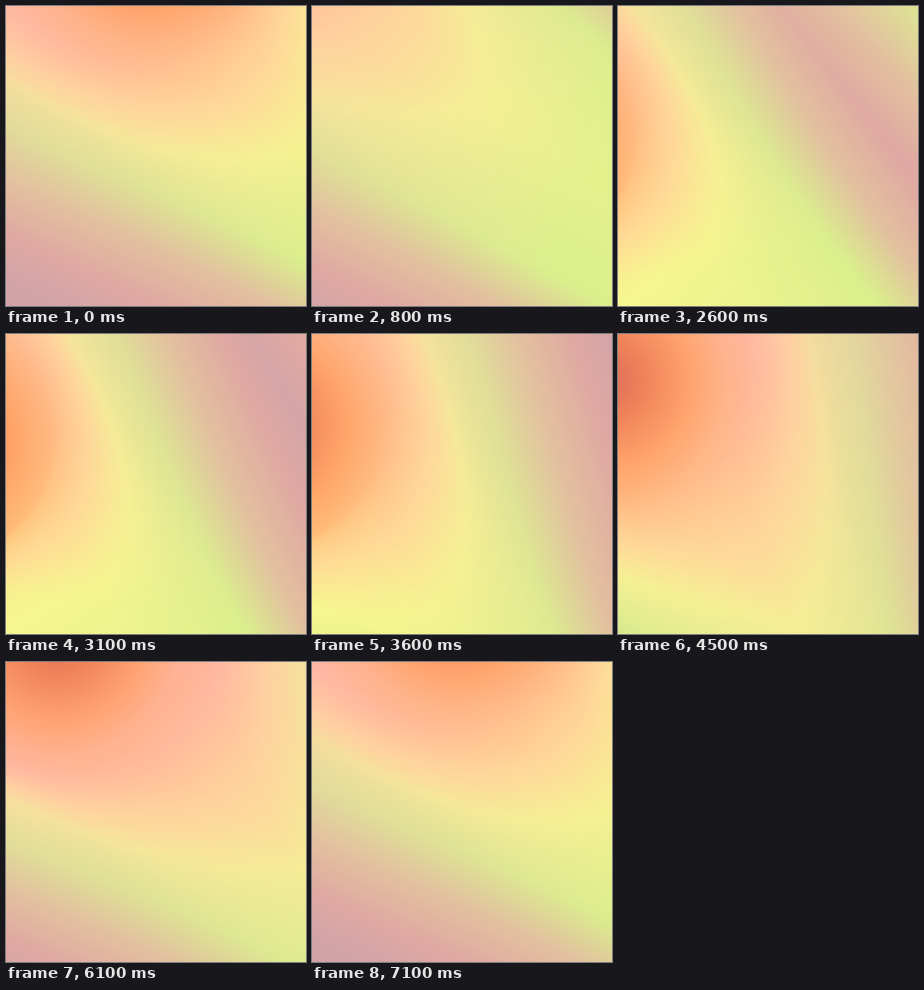
An HTML page with a canvas for the animation above (7200 ms loop, 300 px wide and 300 px high).

```html
<!DOCTYPE html>
<html lang="en">
<head>
<meta charset="utf-8">
<title>Drifting gradient</title>
<style>
  html, body { margin: 0; width: 100%; height: 100%; overflow: hidden; }
  canvas { display: block; width: 100vw; height: 100vh; }
</style>
</head>
<body>
<canvas id="stage" width="300" height="300"></canvas>
<script>
const SIZE = 300, LOOP = 7200, STEP = 100, MID = SIZE / 2;
const GLOW = 125, EDGE = 2.7, RIDGE = 6;

// Two routes from red to mauve, one over pink and one over yellow.
const rgb = s => s.match(/\w\w/g).map(n => parseInt(n, 16));
const pink = 'd46662 f08258 ffa474 ffb7a4 ffcda4 f5dba0 e3d69e e2c09f e0a8a2 cfa2a8'.split(' ').map(rgb);
const lime = 'd46662 f08258 ffa864 ffc878 ffdc92 f6f690 daee8c e2c09f e0a8a2 cfa2a8'.split(' ').map(rgb);

// Where the orange glow drifts: time, x, y of its centre.
const drift = [
  [0, 140, -85], [900, -60, -190], [1700, -190, 240], [2600, -110, 130],
  [3600, -55, 90], [4500, -15, 45], [6100, 50, -30]
];

const lerp = (a, b, k) => a + (b - a) * k;
const clamp = (v, lo, hi) => Math.max(lo, Math.min(hi, v));
const rad = deg => deg * Math.PI / 180;
const phase = (t, peak) => (t - peak) / LOOP * 2 * Math.PI;
const wave = (t, mean, amp, peak) => mean + amp * Math.cos(phase(t, peak));

// Swings from near to far and back; skew makes one way faster.
function swing(t, near, far, peak, skew = 0) {
  const p = phase(t, peak);
  return lerp(near, far, (1 - Math.cos(p + skew * (1 - Math.cos(p)))) / 2);
}

// Position on the smooth closed path at time t.
function driftAt(t) {
  const n = drift.length;
  const key = i => {
    const turn = Math.floor(i / n), [s, x, y] = drift[i - turn * n];
    return [s + turn * LOOP, x, y];
  };
  let i = n - 1;
  while (drift[i][0] > t) i--;
  const [a, b, c, d] = [key(i - 1), key(i), key(i + 1), key(i + 2)];
  const span = c[0] - b[0], k = (t - b[0]) / span, k2 = k * k, k3 = k2 * k;
  return [1, 2].map(j => {
    const m = (c[j] - a[j]) / (c[0] - a[0]) * span;
    const w = (d[j] - b[j]) / (d[0] - b[0]) * span;
    return (2 * k3 - 3 * k2 + 1) * b[j] + (k3 - 2 * k2 + k) * m
      + (3 * k2 - 2 * k3) * c[j] + (k3 - k2) * w;
  });
}

// Distance along a direction, measured from the middle of the stage.
function axis(deg) {
  const c = Math.cos(rad(deg)), s = Math.sin(rad(deg));
  return (x, y) => (x - MID) * c + (y - MID) * s;
}

const ctx = document.getElementById('stage').getContext('2d');
const img = ctx.createImageData(SIZE, SIZE);

function draw(t) {
  const px = img.data;
  const [gx, gy] = driftAt(t);

  // Mauve band from the upper right, mauve front from the lower left.
  const band = axis(-wave(t, 32, 20, 1200));
  const bandAt = swing(t, -10, 250, 2600, -.4);
  const bandWidth = swing(t, 90, 500, 1200);
  const front = axis(120);
  const frontAt = swing(t, 15, 300, 0, .35);

  // Yellow grows along a slowly turning direction.
  const warm = axis(wave(t, 70, 50, 4200));
  const bias = wave(t, .55, .25, 1900);

  let o = 0;
  for (let y = 0; y < SIZE; y++) {
    for (let x = 0; x < SIZE; x++) {
      const mix = clamp(bias + warm(x, y) / 400, 0, 1);
      const inBand = band(x, y) - bandAt;
      const depth = Math.max(Math.min(inBand, bandWidth - inBand), front(x, y) - frontAt);
      const out = Math.hypot(x - gx, y - gy) - GLOW;

      let u = EDGE + out / 50;
      if (out > 0) {
        const gap = clamp(-depth, 0, 100) + 15;
        const reach = Math.pow(out / (out + gap), Math.max(.4, 1.9 - 1.5 * mix));
        u = EDGE + (RIDGE - EDGE + Math.max(0, depth) / 50) * reach;
      }
      u = clamp(u, 0, 8.9);

      const i = Math.floor(u), k = u - i;
      for (let c = 0; c < 3; c++) {
        px[o++] = lerp(lerp(pink[i][c], pink[i + 1][c], k), lerp(lime[i][c], lime[i + 1][c], k), mix);
      }
      px[o++] = 255;
    }
  }
  ctx.putImageData(img, 0, 0);
}

const begin = performance.now();
let shown = -1;
function tick() {
  const t = Math.floor(Math.max(0, performance.now() - begin) % LOOP / STEP) * STEP;
  if (t !== shown) draw(shown = t);
  requestAnimationFrame(tick);
}
tick();
</script>
</body>
</html>
```
